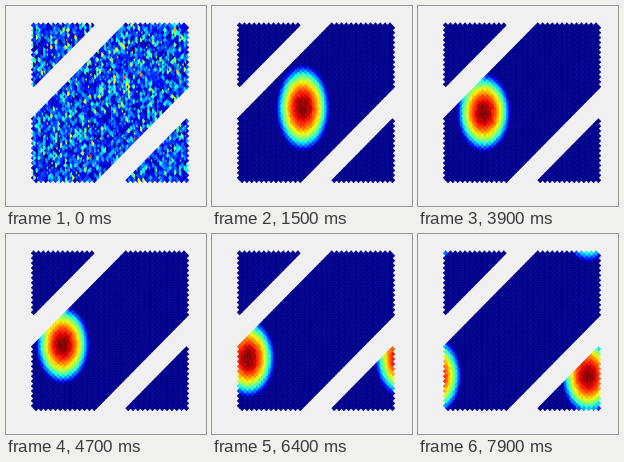
Recreate the animation shown at these times as a matplotlib script. Size 200 by 200 pixels, loop 8000 ms.

```python
import numpy as np
import matplotlib.pyplot as plt
from matplotlib.animation import FuncAnimation
from matplotlib.collections import PolyCollection

SIZE, FRAMES, STEP = 200, 80, 100
N = 32                 # cells per side
PX, PY = 4.85, 4.92    # cell pitch in pixels
X0, Y0 = 25.2, 16.8
PERIOD = 153.5         # wrap length of the activity
HOLD, FORMED = 6, 15   # noise ends, bump is settled


def make_cells():
    """Two staggered diamond lattices, each diamond cut into a left and a right half."""
    col, row, sub = np.meshgrid(np.arange(N), np.arange(N), [0, 0.5], indexing="ij")
    c, r = (col + sub).ravel(), (row + sub).ravel()
    diag = np.rint(c + r).astype(int) % N
    keep = (diag < 13) | (diag > 18)      # leaves the diagonal seam open
    mid = np.column_stack([X0 + PX * (c[keep] + 0.5), Y0 + PY * (r[keep] + 0.5)])
    halves = [mid[:, None, :] + np.array([[0, -PY], [side * PX, 0], [0, PY]]) / 2
              for side in (-1, 1)]
    return np.concatenate(halves)


def wrap(d):
    return (d + PERIOD / 2) % PERIOD - PERIOD / 2


def bump(i):
    u = max(i - FORMED, 0)
    cx = 91 - 0.98 * u - 0.0028 * u ** 2
    cy = 102 + 40 * (u / 64) ** 2.2
    if i < FORMED:
        k = i - HOLD + 1
        hx, hy = 27 + 60 * 0.65 ** k, 40 + 120 * 0.82 ** k
    else:
        hx, hy = 27, 39 + 4 * 0.8 ** u
    r2 = (wrap(x - cx) / hx) ** 2 + (wrap(y - cy) / hy) ** 2
    return np.clip(1 - r2, 0, 1) * grain


def activity(i):
    if i < HOLD:
        return noise
    if i >= FORMED:
        return bump(i)
    w = 0.55 ** (i - HOLD + 1)
    field = (1 - w) * bump(i) + w * noise
    return field / field.max()


rng = np.random.default_rng(4)
shapes = make_cells()
x, y = shapes.mean(axis=1).T
noise = np.abs(rng.normal(size=x.size))
noise /= noise.max()
grain = 1 + rng.normal(0, 0.015, x.size)

fig = plt.figure(figsize=(2, 2), dpi=100, facecolor="#f0f0f0")
ax = fig.add_axes([0, 0, 1, 1])
ax.set(xlim=(0, SIZE), ylim=(SIZE, 0))
ax.axis("off")

cells = PolyCollection(shapes, cmap="jet", edgecolors="face", linewidths=0.4)
cells.set_clim(-0.014, 1)
cells.set_array(noise)
ax.add_collection(cells, autolim=False)


def draw(i):
    cells.set_array(activity(i))
    return [cells]


anim = FuncAnimation(fig, draw, frames=FRAMES, interval=STEP, repeat=True)
plt.show()
```
